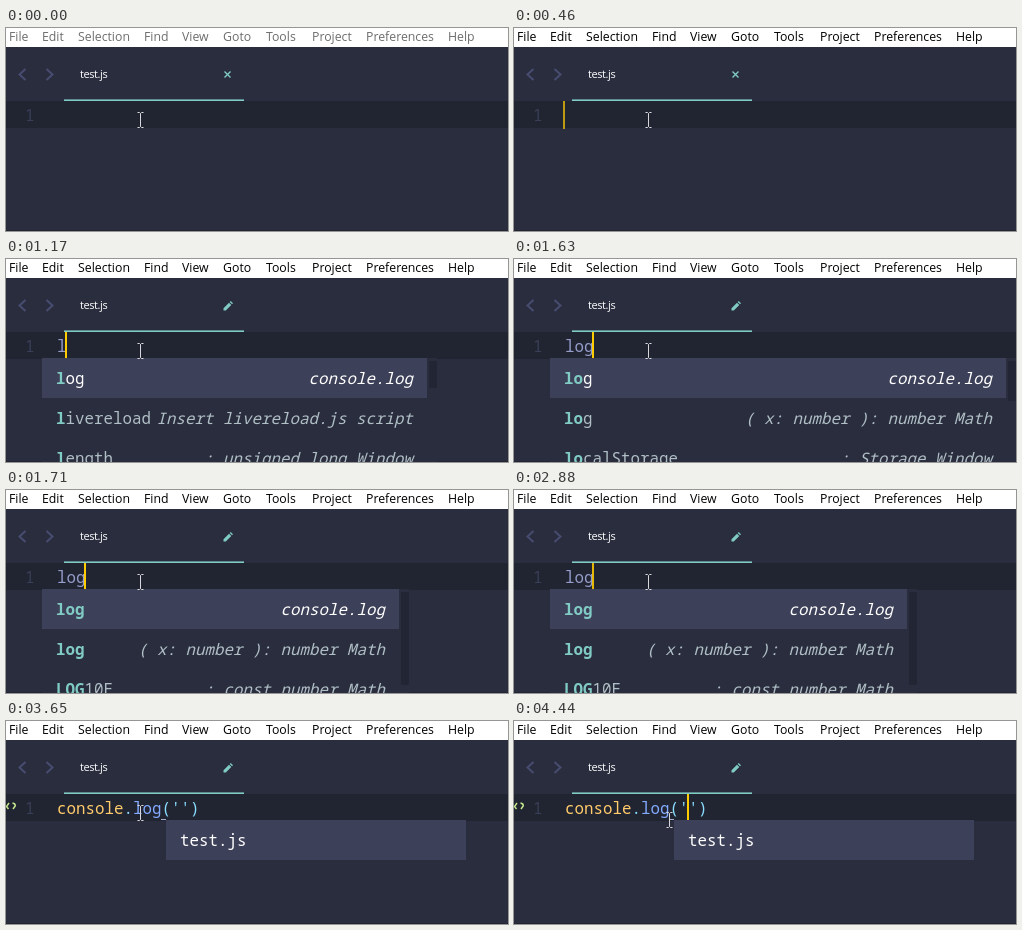
Write an HTML page that moves like this. It is 502x203 px and loops after 4.52 s.

```html
<!DOCTYPE html>
<html lang="en">
<head>
<meta charset="utf-8">
<title>Editor completion</title>
<style>
  html, body { margin: 0; width: 100%; height: 100%; overflow: hidden; background: #292d3e; }
  svg { display: block; }
  text { white-space: pre; }
  .ui { font: 12.3px "Open Sans", "Noto Sans", sans-serif; }
  .tab { font: 11px "Open Sans", "Noto Sans", sans-serif; letter-spacing: -.4px; fill: #fff; }
  .code { font: 15.83px "Noto Sans Mono", "DejaVu Sans Mono", monospace; }
  .match { font-weight: bold; fill: #80cbc4; }
  .note { font-style: italic; text-anchor: end; }
</style>
</head>
<body>
<svg width="502" height="203" viewBox="0 0 502 203">
  <rect width="502" height="203" fill="#292d3e"/>
  <rect width="502" height="19" fill="#fff"/>
  <g id="menu" class="ui"></g>
  <path d="M19.500 41l-6 5.500 6 5.500M40.500 41l6 5.500-6 5.500" fill="none" stroke="#474c70" stroke-width="2"/>
  <text class="tab" x="74" y="50">test.js</text>
  <rect y="73" width="502" height="27" fill="#212431"/>
  <rect x="58" y="71.400" width="180" height="1.600" fill="#80cbc4"/>
  <rect y="202" width="502" height="1" fill="#222533"/>
  <text class="code" x="19" y="93" fill="#3a3f58">1</text>
  <g id="live"></g>
  <g id="mouse" fill="none">
    <path d="M131.500 84.500h2l1 1 1-1h2M134.500 85.500v13M131.500 99.500h2l1-1 1 1h2" stroke="#d8d8dc"/>
  </g>
</svg>
<script>
const LOOP = 4520;
const $ = id => document.getElementById(id);
const rect = (x, y, w, h, fill, more = '') =>
  `<rect x="${x}" y="${y}" width="${w}" height="${h}" fill="${fill}" ${more}/>`;

const menu = { File: 3, Edit: 36, Selection: 72, Find: 138, View: 176, Goto: 217,
  Tools: 260, Project: 306, Preferences: 360, Help: 442 };
$('menu').innerHTML = Object.entries(menu)
  .map(([name, x]) => `<text x="${x}" y="13">${name}</text>`).join('');

// Completion list: rows are [matched, rest, note]; the first one is selected.
function list(right, thumb, rows) {
  const items = rows.map(([match, rest, note], i) => {
    const y = 125 + 40 * i, fill = i ? '#b0bec5' : '#fff';
    return `<g class="code" fill="${fill}">
      <text x="50" y="${y}"><tspan class="match">${match}</tspan>${rest}</text>
      <text class="note" x="${right - 14}" y="${y}">${note}</text></g>`;
  });
  return rect(36, 99, right - 26, 104, '#292d3e') +
    rect(36, 99, right - 36, 40, '#3d4059') +
    rect(right + 2, 102, 8, thumb, '#222533', 'rx="1"') + items.join('');
}

const span = (fill, s) => `<tspan fill="${fill}">${s}</tspan>`;
const call = span('#ffcb6b', 'console') + span('#89ddff', '.') +
  span('#82aaff', 'log') + span('#89ddff', "('')");
const hint = rect(155, 98, 5, 1, '#a6accd') + rect(160, 99, 300, 40, '#3d4059') +
  '<text class="code" x="174" y="125" fill="#fff">test.js</text>';

const closeIcon = '<path d="M218.500 43.500l6 6m0-6l-6 6" stroke="#80cbc4" stroke-width="1.400"/>';
const pencil = '<path d="M217.500 51.500v-2.300l5.500-5.500 2.300 2.300-5.500 5.500zM223.700 43l1-1 2.300 2.300-1 1z" fill="#80cbc4"/>';
const gutter = '<path d="M3 82L.500 85.500 2.500 88M6.500 82q3 .500 2.700 3l-2.200 3" fill="none" stroke="#c3e88d" stroke-width="1.500"/>';

// Each track lists [start time, value].
const code = [[0, ''], [1020, 'l'], [1250, 'lo'], [1630, 'log'], [3030, call]];
const column = [[0, 0], [1020, 1], [1250, 2], [1630, 3], [3030, 13]];
const popup = [
  [0, ''],
  [1170, list(421, 27, [['l', 'og', 'console.log'],
    ['l', 'ivereload', 'Insert livereload.js script'],
    ['l', 'ength', ': unsigned long Window']])],
  [1250, list(492, 40, [['lo', 'g', 'console.log'],
    ['lo', 'g', '( x: number ): number Math'],
    ['lo', 'calStorage', ': Storage Window']])],
  [1710, list(393, 93, [['log', '', 'console.log'],
    ['log', '', '( x: number ): number Math'],
    ['LOG', '10E', ': const number Math']])],
  [3030, hint]
];
const caret = [[0, 0], [80, 1], [460, .7], [550, .35], [630, 0], [1020, 1],
  [2110, .7], [2180, .35], [2340, 0], [2800, .35], [2880, .88], [3030, 1],
  [3420, .7], [3500, .35], [3650, 0], [4050, .35], [4130, .7], [4200, 1]];
const at = (track, t) => track.findLast(([start]) => t >= start)[1];

let shown;
function draw(now) {
  const t = now % LOOP;
  const x = Math.floor(49.5 + 9.5 * at(column, t));
  const scene = (t < 1020 ? closeIcon : pencil) +
    (t < 3180 ? '' : gutter) +
    `<text class="code" x="51" y="93" fill="#959dcb">${at(code, t)}</text>` +
    rect(x, 73, 2, 28, '#ffcc00', `opacity="${at(caret, t)}"`) + at(popup, t);
  if (scene !== shown) $('live').innerHTML = shown = scene;
  $('menu').setAttribute('fill', t < 80 ? '#6d6d6d' : '#000');
  $('mouse').setAttribute('transform', t < 4440 ? '' : 'translate(21 7)');
}

const start = performance.now();
function tick() {
  draw(performance.now() - start);
  requestAnimationFrame(tick);
}
tick();
</script>
</body>
</html>
```
